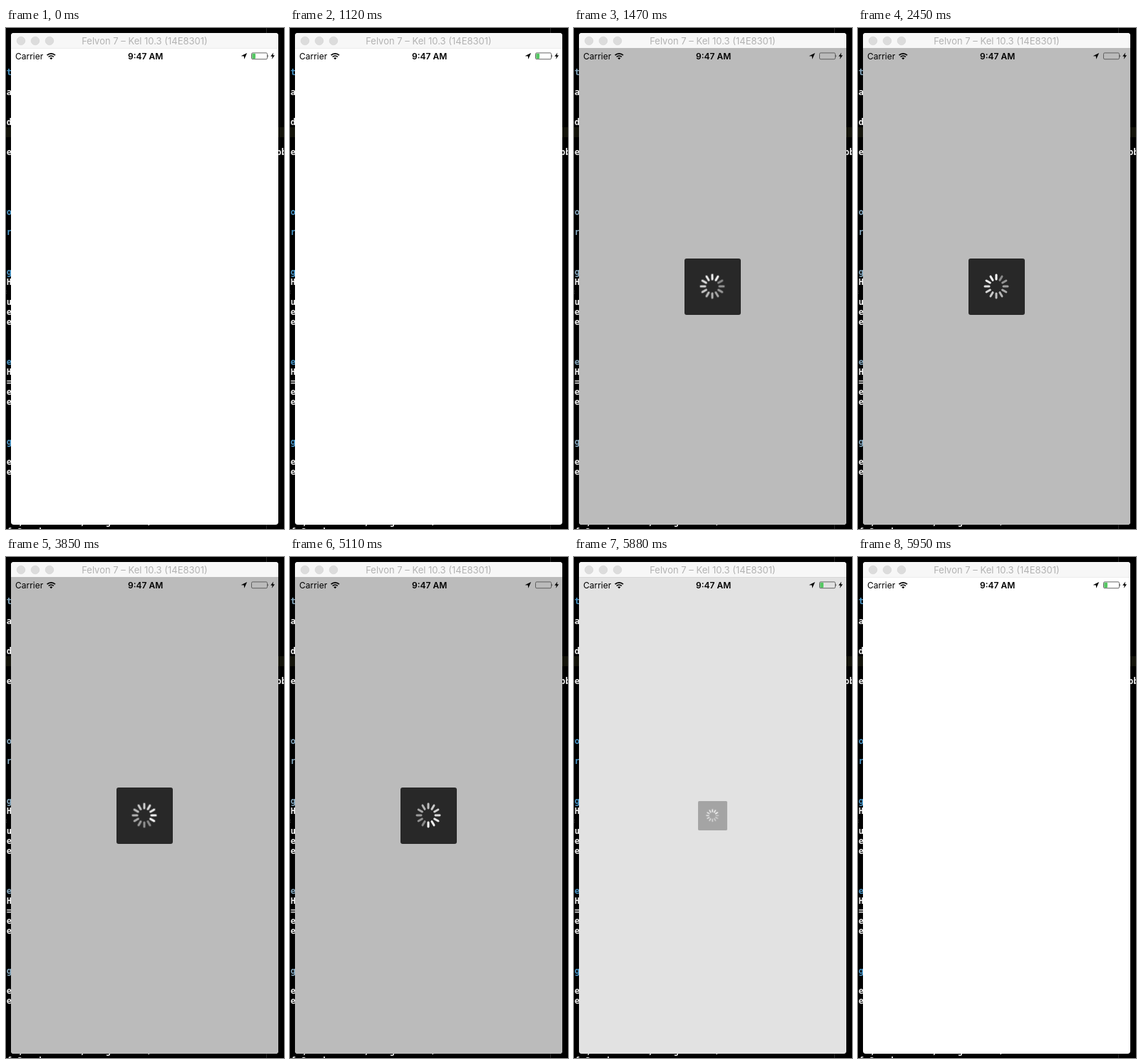
Animation of 390x702 px, one loop 6160 ms. Source, as an HTML page:

```html
<!DOCTYPE html>
<html lang="en">
<head>
<meta charset="utf-8">
<title>Loading indicator</title>
<style>
  html, body { margin: 0; width: 100%; height: 100%; overflow: hidden; background: #000; }
  svg { display: block; width: 390px; height: 702px; }
  text { font-family: Inter, Roboto, sans-serif; }
  .code text { font: bold 12px "DejaVu Sans Mono", monospace; fill: #f2f2f2; white-space: pre; }
  .code .key { fill: #4a97c9; animation: pale 6160ms step-end infinite; }
  .title { font-size: 13px; fill: #b2b2b2; text-anchor: middle; }
  .status { font-size: 12px; }
  .charge { animation: drain 6160ms step-end infinite; }
  .hud { animation: fade 6160ms step-end infinite; }
  .box { transform-origin: 194.5px 362.5px; animation: zoom 6160ms step-end infinite; }
  .spin { transform-origin: 194px 362px; animation: spin 6160ms infinite; }

  @keyframes fade {
    0%, 96.58% { opacity: 0; }
    20.44% { opacity: .61; }
    21.58% { opacity: .86; }
    22.72% { opacity: .97; }
    23.85%, 93.17% { opacity: 1; }
    94.31% { opacity: .8; }
    95.44% { opacity: .425; }
  }
  @keyframes zoom {
    0%, 20.44% { transform: scale(.848); }
    21.58% { transform: scale(.95); }
    22.72% { transform: scale(.99); }
    23.85%, 93.17% { transform: scale(1); }
    94.31% { transform: scale(.83); }
    95.44% { transform: scale(.518); }
  }
  @keyframes spin {
    0% { transform: rotate(300deg); }
    19.112% { transform: rotate(300deg); animation-timing-function: steps(53, end); }
    95.687%, 100% { transform: rotate(1890deg); }
  }
  @keyframes drain {
    0%, 94.31% { opacity: 1; }
    22.72% { opacity: 0; }
  }
  @keyframes pale {
    0%, 94.31% { fill: #4a97c9; }
    22.72% { fill: #86a9c0; }
  }
</style>
</head>
<body>
<svg viewBox="0 0 390 702" xmlns="http://www.w3.org/2000/svg">
  <rect width="390" height="702" fill="#000"/>
  <rect y="139" width="390" height="14" fill="#14140b"/>
  <path d="M365.5 0V702" stroke="#2a2a2a"/>
  <g class="code">
    <g id="edge" text-anchor="end"></g>
    <text x="379" y="178">bb</text>
    <text x="17" y="696">, width: 200, height: 200)</text>
    <text x="1" y="710">f Service</text>
  </g>

  <rect x="7" y="7" width="375" height="689" rx="4" fill="#fff"/>
  <path d="M7 28V11a4 4 0 0 1 4-4H378a4 4 0 0 1 4 4V28z" fill="#f7f7f7"/>
  <path d="M7 28.5H382" stroke="#ececec"/>
  <g fill="#dcdcdc" stroke="#d2d2d2" stroke-width=".6">
    <circle cx="21" cy="18" r="5.8"/>
    <circle cx="41" cy="18" r="5.8"/>
    <circle cx="61" cy="18" r="5.8"/>
  </g>
  <text class="title" x="194.5" y="23">Felvon 7 – Kel 10.3 (14E8301)</text>

  <g class="hud">
    <path d="M7 28H382V692a4 4 0 0 1-4 4H11a4 4 0 0 1-4-4z" fill="#bbb"/>
    <g class="box">
      <rect x="155" y="323" width="79" height="79" rx="3" fill="#282828"/>
      <g class="spin" id="spokes" stroke="#fff" stroke-width="3" stroke-linecap="round"></g>
    </g>
  </g>

  <g class="status">
    <text x="13" y="44">Carrier</text>
    <text x="195.6" y="43.5" text-anchor="middle" font-weight="600">9:47 AM</text>
    <g fill="none" stroke="#000" stroke-width="1.7">
      <path d="M57.6 38.2a8.2 8.2 0 0 1 11.4 0"/>
      <path d="M59.7 40.5a5.2 5.2 0 0 1 7.2 0"/>
    </g>
    <path d="M61.3 42.2a2.8 2.8 0 0 1 4 0L63.3 44.3z"/>
    <path d="M338.2 35L329.6 39.2L333.8 39.5L334.2 43.8z"/>
    <rect x="344.5" y="34.9" width="22" height="8.8" rx="1.6" fill="none" stroke="#555" stroke-width=".9"/>
    <path d="M367.4 37.6q1.6 1.7 0 3.4z" fill="#333"/>
    <rect class="charge" x="345.3" y="35.7" width="4.7" height="7.2" rx=".8" fill="#55c763"/>
    <path d="M375.2 34.4L371.2 39.7H373.8L372.8 43.8L377 38.3H374.4z"/>
  </g>
</svg>
<script>
  const NS = "http://www.w3.org/2000/svg";
  const add = (id, tag, attrs, text = "") => {
    const el = document.createElementNS(NS, tag);
    for (const key in attrs) el.setAttribute(key, attrs[key]);
    el.textContent = text;
    document.getElementById(id).append(el);
  };

  // Code peeking out beside the window: baseline, text, keyword flag
  const lines = [
    [66, "t", 1], [94, "a"], [136, "d"], [178, "e"], [262, "ro", 1], [290, "r", 1],
    [346, "g", 1], [360, "H"], [374, "= "], [388, "u"], [402, "e"], [416, "e"],
    [472, "ve", 1], [486, "H"], [500, "="], [514, "e"], [528, "e"],
    [584, "g", 1], [612, "e"], [626, "e"]
  ];
  for (const [y, text, key] of lines) {
    add("edge", "text", { x: 8, y, class: key ? "key" : "" }, text);
  }

  // Head spoke at twelve, tail fading counter-clockwise
  for (let i = 0; i < 12; i++) {
    add("spokes", "path", {
      d: "M194 346V352",
      transform: `rotate(${-30 * i} 194 362)`,
      opacity: 1 - 0.05 * i
    });
  }
</script>
</body>
</html>
```
